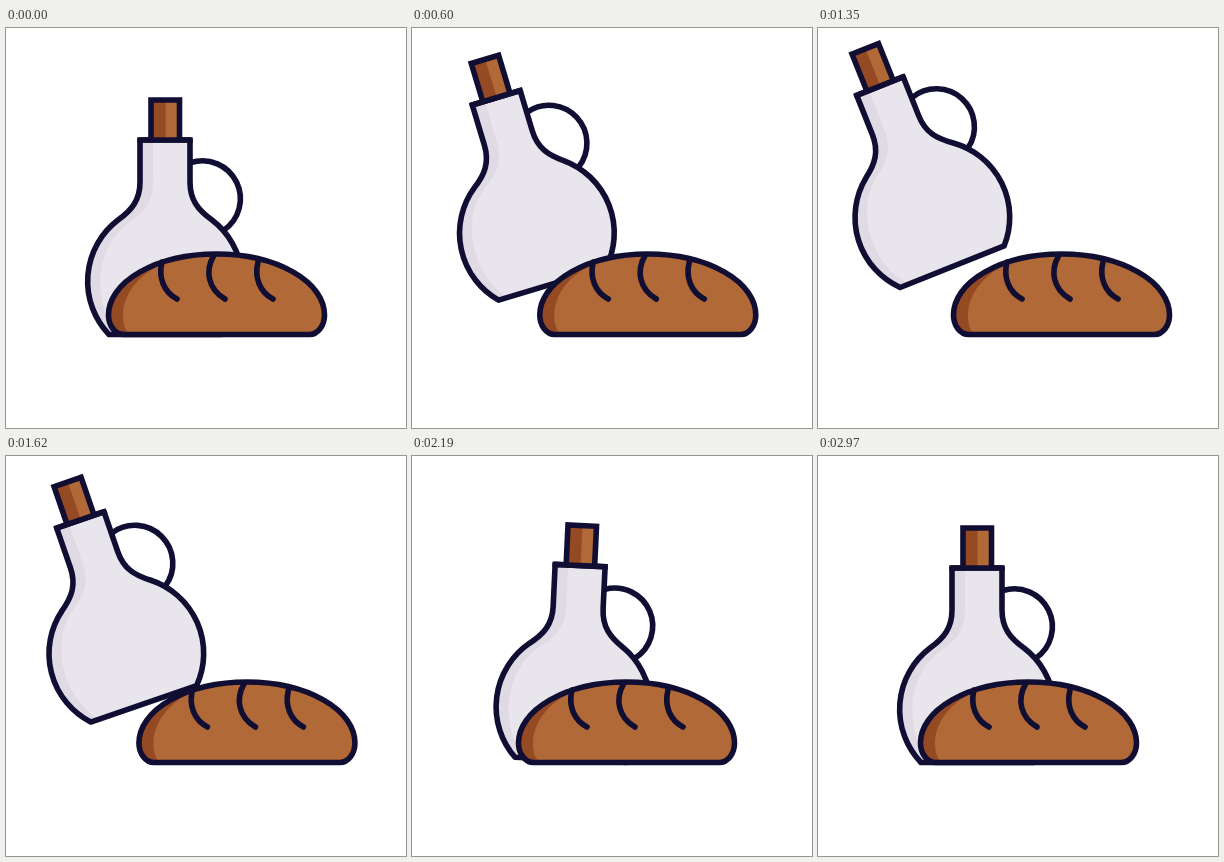
Recreate the animation shown at these times as an HTML page with a canvas. Size 400x400 px, loop 5000 ms.

```html
<!DOCTYPE html>
<html lang="en">
<head>
<meta charset="utf-8">
<title>Bottle and bread</title>
<style>
  html, body { margin: 0; width: 100%; height: 100%; overflow: hidden; background: #fff; }
  canvas { display: block; width: 100%; height: 100%; }
</style>
</head>
<body>
<canvas id="stage" width="400" height="400"></canvas>
<script>
const ctx = document.getElementById('stage').getContext('2d');
const LOOP = 5000, STEP = 30;
const INK = '#110e33', GLASS = '#e9e5ec', GLASS_SHADE = '#dfdae4';
const CRUST = '#b16937', CRUST_SHADE = '#964a23';
const PIVOT = { x: 159, y: 189 };

// time, bottle x, bottle y, bottle tilt in degrees, bread x
const keys = [
  [0, 0, 0, 0, 0],
  [360, -25.5, -22, -8.3, 12],
  [540, -48.5, -42, -15.4, 23.3],
  [870, -65, -56, -20.8, 31.2],
  [1200, -70, -60.5, -22.3, 33.8],
  [1350, -68.5, -59.4, -21.8, 33],
  [1650, -58, -51, -18.5, 30],
  [1830, -36, -31.5, -11.6, 24],
  [2190, 5.5, -2.5, 2.7, 4],
  [2500, 11.5, -5.2, 6.3, 0.3],
  [2700, 10, -4.3, 5.5, 0],
  [2970, 0, 0, 0, 0]
];

const body = new Path2D(
  'M134 112 V154 C134 172 126 182 112 192 A77 77 0 0 0 103 306.5 ' +
  'H215 A77 77 0 0 0 206 192 C192 182 184 172 184 154 V112 Z');
const bodyLight = new Path2D(
  'M147 112 V154 C147 172 140 183 125 193 C85 220 88 280 112 306 H240 V112 Z');
const handle = new Path2D('M185 134.5 A38 38 0 0 1 218 202');
const cork = new Path2D('M145 112 V72 H173.5 V112');
const lip = new Path2D('M131.3 112 H186.7');
const loaf = new Path2D(
  'M117.5 306.5 A15 19.5 0 0 1 102.5 287 A108 61 0 0 1 318.5 287 ' +
  'A15 19.5 0 0 1 303.5 306.5 Z');
const loafLight = new Path2D(
  'M165 232 C135 243 117 265 117 287 C117 296 119 302 123 306 H330 V220 H165 Z');
const cuts = new Path2D(
  'M156 234 C152 250 158 264 171 271 ' +
  'M207.5 228 C199 243 202 261 219 271 ' +
  'M252 234 C248 250 254 264 267 271');

// Monotone tangent: zero at extremes, harmonic mean elsewhere
function slope(i, c) {
  if (i === 0 || i === keys.length - 1) return 0;
  const [a, b, d] = [keys[i - 1], keys[i], keys[i + 1]];
  const before = (b[c] - a[c]) / (b[0] - a[0]);
  const after = (d[c] - b[c]) / (d[0] - b[0]);
  return before * after <= 0 ? 0 : 2 * before * after / (before + after);
}

function valueAt(t, c) {
  const last = keys.length - 1;
  if (t >= keys[last][0]) return keys[last][c];
  let i = 0;
  while (t >= keys[i + 1][0]) i++;
  const a = keys[i], b = keys[i + 1], span = b[0] - a[0];
  const u = (t - a[0]) / span, v = 1 - u;
  return a[c] * v * v * (1 + 2 * u) + b[c] * u * u * (3 - 2 * u) +
    span * u * v * (slope(i, c) * v - slope(i + 1, c) * u);
}

function fill(path, color) {
  ctx.fillStyle = color;
  ctx.fill(path);
}

function shaded(shape, light, dark, bright) {
  fill(shape, dark);
  ctx.save();
  ctx.clip(shape);
  fill(light, bright);
  ctx.restore();
}

function drawBottle(x, y, tilt) {
  ctx.save();
  ctx.translate(PIVOT.x + x, PIVOT.y + y);
  ctx.rotate(tilt * Math.PI / 180);
  ctx.translate(-PIVOT.x, -PIVOT.y);
  ctx.lineCap = 'butt';
  ctx.lineJoin = 'round';
  ctx.stroke(handle);
  shaded(body, bodyLight, GLASS_SHADE, GLASS);
  ctx.stroke(body);
  fill(cork, CRUST);
  ctx.fillStyle = CRUST_SHADE;
  ctx.fillRect(145, 72, 14.5, 40);
  ctx.lineJoin = 'miter';
  ctx.stroke(cork);
  ctx.stroke(lip);
  ctx.restore();
}

function drawBread(x) {
  ctx.save();
  ctx.translate(x, 0);
  ctx.lineCap = ctx.lineJoin = 'round';
  shaded(loaf, loafLight, CRUST_SHADE, CRUST);
  ctx.stroke(loaf);
  ctx.stroke(cuts);
  ctx.restore();
}

const start = performance.now();

function render() {
  const elapsed = Math.max(0, performance.now() - start) % LOOP;
  const t = Math.floor(elapsed / STEP) * STEP;
  ctx.fillStyle = '#fff';
  ctx.fillRect(0, 0, 400, 400);
  ctx.strokeStyle = INK;
  ctx.lineWidth = 5.6;
  drawBottle(valueAt(t, 1), valueAt(t, 2), valueAt(t, 3));
  drawBread(valueAt(t, 4));
  requestAnimationFrame(render);
}
render();
</script>
</body>
</html>
```
